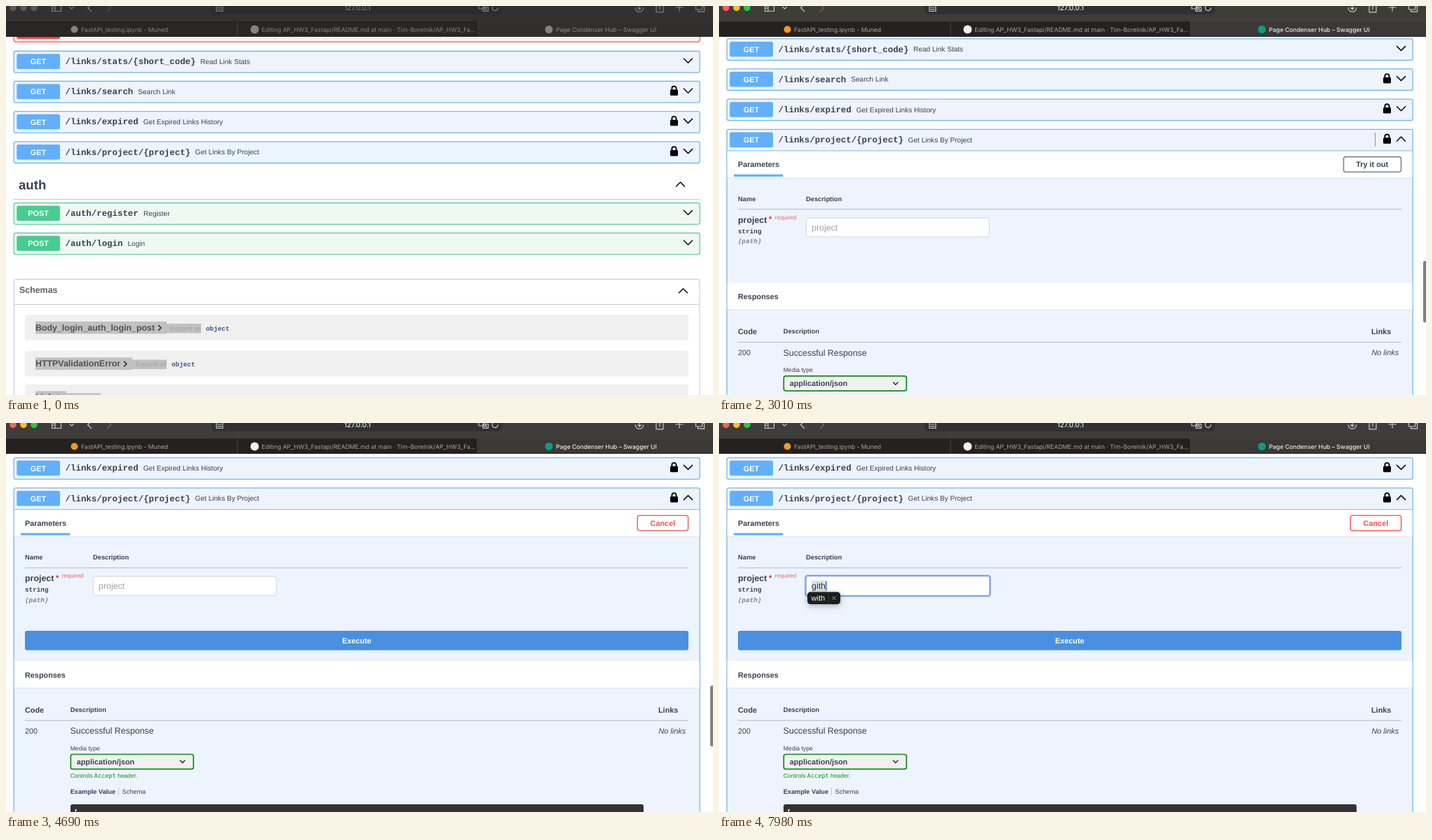
Write an HTML page that moves like this. It is 1008x556 px and loops after 8000 ms.

```html
<!DOCTYPE html>
<html lang="en">
<head>
<meta charset="utf-8">
<title>API docs</title>
<style>
html, body { margin: 0; width: 100%; height: 100%; overflow: hidden; background: #fff; }
svg { display: block; width: 100%; height: 100%; }
text { font-family: "Liberation Sans", Arial, sans-serif; fill: #3b4151; white-space: pre; text-rendering: geometricPrecision; }
.b { font-weight: 700; }
.i { font-style: italic; }
.mid { text-anchor: middle; }
.mono { font-family: "Liberation Mono", monospace; }
.code { font-family: "DejaVu Sans Mono", monospace; }
.white { fill: #fff; }
.line { fill: none; stroke-linecap: round; stroke-linejoin: round; }
#chrome { --bar: #3f3d3a; --field: #33312f; --tab: #232220; --on: #3b3936; --ink: #c9c7c4; --dim: #6d6b68; --label: #a9a7a4; --strong: #ececea; }
#chrome.idle { --bar: #32312f; --field: #2d2c2a; --tab: #282725; --on: #302f2d; --ink: #83817f; --dim: #555351; --label: #868482; --strong: #8d8b89; }
#chrome.idle .tint { fill: #5c5a58; }
#chrome.idle .mark { fill: #85837f; }
#chrome text { font-family: Inter, "Open Sans", sans-serif; fill: var(--label); }
#chrome text.strong { fill: var(--strong); font-weight: 500; }
#chrome.idle text.strong { font-weight: 400; }
#chrome .icon { fill: none; stroke: var(--ink); stroke-width: 1.2; stroke-linecap: round; stroke-linejoin: round; }
#chrome .icon.faint { stroke: var(--dim); }
#popup { filter: drop-shadow(0 2px 4px rgba(0,0,0,.3)); }
</style>
</head>
<body>
<svg id="stage" viewBox="0 0 1008 556" preserveAspectRatio="none"></svg>
<script>
const LOOP = 8000, TICK = 70;
const BLUE = '#61affe', GREEN = '#49cc90';
const BLOCK = {
  GET: { main: BLUE, edge: '#75b8ee', fill: '#edf4fe' },
  POST: { main: GREEN, edge: '#63cf9f', fill: '#eef9f3' }
};

const text = (x, y, size, str, cls = '', extra = '') =>
  `<text x="${x}" y="${y}" font-size="${size}" class="${cls}" ${extra}>${str}</text>`;
const rect = (x, y, w, h, fill, rx = 0, extra = '') =>
  `<rect x="${x}" y="${y}" width="${w}" height="${h}" rx="${rx}" fill="${fill}" ${extra}/>`;
const path = (d, stroke = '#111', width = 1.6, extra = '') =>
  `<path class="line" d="${d}" stroke="${stroke}" stroke-width="${width}" ${extra}/>`;
const dot = (x, y, r, fill, cls) => `<circle class="${cls}" cx="${x}" cy="${y}" r="${r}" fill="${fill}"/>`;
const icon = (d, cls = '') => `<path class="icon ${cls}" d="${d}"/>`;
const rule = y => rect(27, y, 946, 1, '#b3b9c4');
const chevron = (x, y, up) => up
  ? `M${x - 6} ${y + 3}l6 -6l6 6`
  : `M${x - 6} ${y - 3}l6 6l6 -6`;

function lock(top) {
  return rect(947, top + 12.5, 11, 8.5, '#000', 1.3) +
    path(`M949.4 ${top + 13}v-2.2a3.1 3.1 0 0 1 6.2 0v2.2`, '#000', 1.9);
}

function row(top, method, url, titleX, title, locked, id = '') {
  const c = BLOCK[method];
  return rect(11.2, top + .5, 978, 30.6, c.fill, 3, `stroke="${c.edge}" stroke-width="1.3" id="${id}box"`) +
    rect(15.3, top + 4.6, 61.7, 21.5, c.main, 2.5) +
    text(46, top + 19.3, 10.9, method, 'b mid white') +
    text(84.6, top + 19.2, 12.4, url, 'b mono') +
    text(titleX, top + 19, 10.08, title) +
    (locked ? lock(top) : '') +
    path(chevron(972.5, top + 14.2), '#111', 1.6, `id="${id}arrow"`);
}

function model(top, name, nameEnd) {
  const y = top + 22;
  return rect(27, top, 946, 36.5, '#f0f0f0', 3) +
    rect(42, top + 9.5, nameEnd - 42, 17.5, '#c1c1c1') +
    rect(nameEnd, top + 12.5, 49, 13.5, '#c1c1c1') +
    text(42, y, 12.4, name, 'b', 'style="fill:#505050"') +
    path(`M${nameEnd - 11.5} ${top + 15}l3.5 3.5l-3.5 3.5`, '#222', 1.5) +
    text(nameEnd + 5, y, 9.3, 'Expand all', '', 'style="fill:#a3a3a3"') +
    text(nameEnd + 56, y, 9.3, 'object', 'b mono', 'style="fill:#3d4f86"');
}

const lower = text(18, 262.3, 18.6, 'auth', 'b') +
  path(chevron(961.5, 254.8, true)) +
  rect(10, 276, 980, 1, '#c6c8cc') +
  row(281, 'POST', '/auth/register', 196, 'Register') +
  row(324, 'POST', '/auth/login', 173.5, 'Login') +
  rect(11.5, 390.5, 977.5, 200, '#fff', 3, 'stroke="#c4c6ca"') +
  text(19, 410.2, 12.4, 'Schemas', 'b', 'style="fill:#606060"') +
  path(chevron(965.5, 407, true)) +
  rect(12, 426, 977, 1, '#c9cbcf') +
  model(441.5, 'Body_login_auth_login_post', 229) +
  model(493, 'HTTPValidationError', 180) +
  model(541, 'Links', 86);

const parameters = rect(11.8, 225, 976.7, 38, '#fff') +
  rect(11.8, 224, 976.7, 1, '#86bdec') + rect(11.8, 263, 976.7, 1, '#dde4ec') +
  text(27, 247.8, 10.85, 'Parameters', 'b') +
  rect(21, 258.3, 70.3, 3.2, BLUE) +
  text(27, 296.2, 9.3, 'Name', 'b') + text(124, 296.2, 9.3, 'Description', 'b') + rule(307.5) +
  text(27, 327.2, 12.4, 'project', 'b') +
  text(71, 326, 11, '*', 'b', 'style="fill:#e22"') +
  text(79.8, 322.4, 8.4, 'required', '', 'style="fill:#f4605c"') +
  text(27, 342.3, 9.3, 'string', 'b mono') +
  text(27, 357, 9.3, '(path)', 'b i mono', 'style="fill:#808390"') +
  rect(124.3, 320.3, 261, 27.2, '#fff', 3, 'id="field" stroke="#d3d6db"') +
  rect(131.5, 326, 21.5, 16, '#dde3e8', 1, 'id="mark"') +
  text(132, 338.2, 12.4, 'project', '', 'id="hint" style="fill:#a2a2a2"') +
  text(132, 338.2, 12.4, '', '', 'id="typed" style="fill:#333"') +
  rect(132.2, 327, 1.5, 14, '#2f73cc', .7, 'id="caret"') +
  rect(888.5, 231.6, 86, 25, 'none', 4, 'id="hover" stroke="#000" stroke-opacity=".16" stroke-width="2"') +
  rect(890.5, 233.2, 82, 21.6, '#fff', 3, 'id="button" stroke-width="1.6"') +
  text(931.5, 247.8, 10.85, '', 'b mid', 'id="buttonText"') +
  `<g id="execute">${rect(27, 398, 946, 27.7, '#4990e2', 3)}${text(500, 415.7, 10.85, 'Execute', 'b mid white')}</g>`;

const responses = rect(11.8, 413, 976.7, 38.5, '#fff') + rect(11.8, 451.5, 976.7, 1, '#dde4ec') +
  text(27, 436.5, 10.85, 'Responses', 'b') +
  text(27, 486.5, 10.85, 'Code', 'b') + text(91.7, 485.8, 9.3, 'Description', 'b') +
  text(930, 486.5, 10.85, 'Links', 'b') + rule(497.7) +
  text(27, 516.8, 10.85, '200') + text(91.5, 517.4, 12.4, 'Successful Response') +
  text(930.5, 516.6, 10.85, 'No links', 'i') +
  text(91.7, 541, 8.6, 'Media type') +
  rect(92.3, 546.5, 175, 21.2, '#f0f2f2', 3, 'stroke="#148a1c" stroke-width="1.7"') +
  text(100.7, 560.9, 10.85, 'application/json', 'b') +
  path('M248.5 555.6l3.2 3.2l3.2 -3.2', '#222', 1.4) +
  text(91.7, 579.6, 8.53, 'Controls <tspan class="code">Accept</tspan> header.', '', 'style="fill:#148a1c"') +
  text(91.7, 603.2, 9.2, 'Example Value', 'b') + rect(160, 594, 1, 11, '#c5cad2') +
  text(165.5, 603.2, 9.2, 'Schema') +
  rect(92, 618, 817, 200, '#333', 3) +
  text(96.5, 632.5, 10.3, '[', 'b code white') +
  text(108.9, 644.7, 10.3, '{', 'b code white') +
  text(121.3, 656.8, 10.3, '"original_url": <tspan fill="#a2fca2">"string"</tspan>,', 'b code white');

const copyButton = `<g id="copy">${rect(915, 198.7, 18.5, 19.6, '#7d8492', 2.5, 'id="copyBox"')}
  <g id="copyIcon">${path('M927.5 204.5h1.2v2.5M921.5 204.5h-1v9.8h8.2v-1.8M922.7 203.3h3.8v2h-3.8zM929.8 209.8h-4.6m1.8 -1.8l-1.8 1.8l1.8 1.8M922.2 208h2M922.2 211.8h1.6', '#fff', 1)}</g></g>`;

const page = rect(11.2, 20, 978, 31.3, '#feeeee', 3, 'stroke="#f0605f" stroke-width="1.3"') +
  rect(15.3, 30, 61.7, 17, '#f93e3e', 2.5) +
  row(64, 'GET', '/links/stats/{short_code}', 277, 'Read Link Stats') +
  row(107, 'GET', '/links/search', 188.3, 'Search Link', true) +
  row(150.2, 'GET', '/links/expired', 195.7, 'Get Expired Links History', true) +
  `<g id="lower">${lower}</g>` +
  row(193.4, 'GET', '/links/project/{project}', 269.6, 'Get Links By Project', true, 'main') +
  copyButton +
  `<g id="open">${parameters}<g id="responses">${responses}</g></g>`;

const popup = `<g id="popup">${rect(126, 241.5, 47, 17.5, '#1c1e1e', 4.5)}${rect(155.7, 242, .8, 16.5, '#3c3e3e')}
  ${text(131.5, 253.8, 11, 'with', 'white')}${path('M161.6 248l4.6 4.6m0 -4.6l-4.6 4.6', '#a9abab', 1)}</g>`;

const chrome = `<g id="chrome">
  ${rect(0, 0, 1008, 23, 'var(--bar)')}${rect(293, -12, 414, 24, 'var(--field)', 5)}
  ${rect(0, 23, 670, 21, 'var(--tab)')}${rect(670, 23, 338, 21, 'var(--on)')}
  ${rect(0, 22.5, 670, 1, '#1b1a19')}${rect(329.5, 23, 1, 21, '#4a4845')}${rect(670, 23, 1, 21, '#191817')}${rect(0, 43.2, 1008, .8, '#1b1a19')}
  ${dot(10, 2.4, 4.8, '#fe5f57', 'tint')}${dot(25, 2.4, 4.8, '#febc2e', 'tint')}${dot(40, 2.4, 4.8, '#28c840', 'tint')}
  ${icon('M65.5 -3h13v10.5h-13zM70 -3v10.5M67 1h1.4M67 3.5h1.4M91 1.5l2.6 2.6l2.6 -2.6M121.5 -2.5l-5 5l5 5')}
  ${icon('M144.5 -2.5l5 5l-5 5', 'faint')}
  ${icon('M300 -3h9v10.5h-9zM302 2h5M302 4.8h5M674 -2h7v6h-7zM680 1.5h7.5v6h-7.5zM682 6l1.8 -3.4l1.8 3.4M701.3 2.6a4 4 0 1 1 -1.4 -3')}
  ${icon('M908.8 2.5a5.8 5.8 0 1 1 -11.6 0M903 -2v7m-2.4 -2.4l2.4 2.4l2.4 -2.4M927 0v8.8h10v-8.8M932 -3v8M960 -3v10M955 2h10M983.5 -2v7h9v-7M986.5 5v3.2h9v-8h-3')}
  ${text(501, 6.4, 9.8, '127.0.0.1', 'mid strong')}
  ${dot(97.5, 33.5, 5, '#f39a1b', 'mark')}${text(107, 36.8, 8.6, 'FastAPI_testing.ipynb - Muned')}
  ${dot(354.5, 33.5, 6, '#f2f2f2', 'mark')}${text(364.5, 36.8, 8.6, 'Editing AP_HW3_Fastapi/README.md at main · Tim-Borelnik/AP_HW3_Fa…')}
  ${dot(774, 33.5, 5.5, '#0b9c8a', 'mark')}${text(784, 36.8, 8.6, 'Page Condenser Hub – Swagger UI', 'strong')}
</g>`;

document.getElementById('stage').innerHTML = rect(0, 0, 1008, 556, '#fff') +
  `<g id="page">${page}</g>${popup}${rect(1004, 0, 6, 88, '#808080', 2.5, 'id="thumb"')}${chrome}`;

const ui = {};
document.querySelectorAll('[id]').forEach(el => ui[el.id] = el);
const set = (id, attrs) => { for (const k in attrs) ui[id].setAttribute(k, attrs[k]); };
const show = (id, on) => { ui[id].style.display = on ? '' : 'none'; };

// Step tables: [start time, value]
const SCROLL = [[0, 0], [2660, 1], [2730, 2], [2800, 4], [2870, 6], [2940, 10], [3010, 17.6], [3080, 60], [3150, 99.5], [3220, 100.7], [3290, 101]];
const COPY = [[0, 0], [1260, .15], [1330, .6], [1400, .9], [1470, 1], [2800, .85], [2870, .4], [2940, .15], [3010, .05], [3080, 0]];
const THUMB = [[0, 0], [2660, .4], [2730, .8], [2800, 1], [6020, .75], [6090, .45], [6160, .2], [6230, 0]];
const CARET = [[0, 0], [5530, 1], [5950, .9], [6020, .7], [6090, .45], [6160, .2], [6230, 0], [6510, .5], [6580, 1]];
const TYPED = [[0, ''], [7070, 'g'], [7210, 'gi'], [7350, 'git'], [7630, 'gith']];
const EDGE = [[0, '#858585'], [4550, '#a9807f'], [4620, '#c87a78'], [4690, '#e4716f'], [4760, '#fb6562']];
const at = (table, t) => table.filter(step => step[0] <= t).pop()[1];

function render(now) {
  const t = Math.floor(now % LOOP / TICK) * TICK;
  const open = t >= 2240, trying = t >= 4550, focus = t >= 5530, suggest = t >= 7980;
  const scroll = at(SCROLL, t), copy = at(COPY, t), typed = at(TYPED, t);

  ui.chrome.classList.toggle('idle', t < 1050);
  set('page', { transform: `translate(0 ${-scroll})` });
  show('lower', !open);
  show('open', open);
  set('mainbox', { height: open ? 700 : 30.6 });
  set('mainarrow', { d: chevron(972.5, 207.6, open) });

  show('copy', copy > 0);
  set('copyBox', { x: 915 + 21 * (1 - copy), width: 18.5 * copy, rx: Math.min(2.5, 9 * copy) });
  show('copyIcon', copy > .8);

  set('thumb', { y: 361.5 + scroll * .155 - (trying ? 2 : 0), height: trying ? 87 : 88, opacity: at(THUMB, t) });

  show('hover', t >= 4340 && !trying);
  set('button', { x: trying ? 900.2 : 890.5, width: trying ? 72.4 : 82, stroke: at(EDGE, t) });
  set('buttonText', { x: trying ? 936.4 : 931.2 });
  ui.buttonText.textContent = trying ? 'Cancel' : 'Try it out';
  ui.buttonText.style.fill = trying ? '#f0534f' : '#3b4151';
  show('execute', trying);
  set('responses', { transform: `translate(0 ${trying ? 28 : 0})` });

  set('field', focus
    ? { stroke: '#85a9e6', 'stroke-width': 2.6, x: 123.4, y: 319.2, width: 263, height: 29 }
    : { stroke: '#d3d6db', 'stroke-width': 1, x: 124.3, y: 320.3, width: 261, height: 27.2 });
  show('hint', !typed);
  ui.typed.textContent = typed;
  set('caret', { x: 132.3 + (typed ? ui.typed.getComputedTextLength() - .3 : 0), opacity: at(CARET, t) });
  show('mark', suggest);
  show('popup', suggest);
}

const start = performance.now();
function frame() {
  render(performance.now() - start);
  requestAnimationFrame(frame);
}
frame();
</script>
</body>
</html>
```
